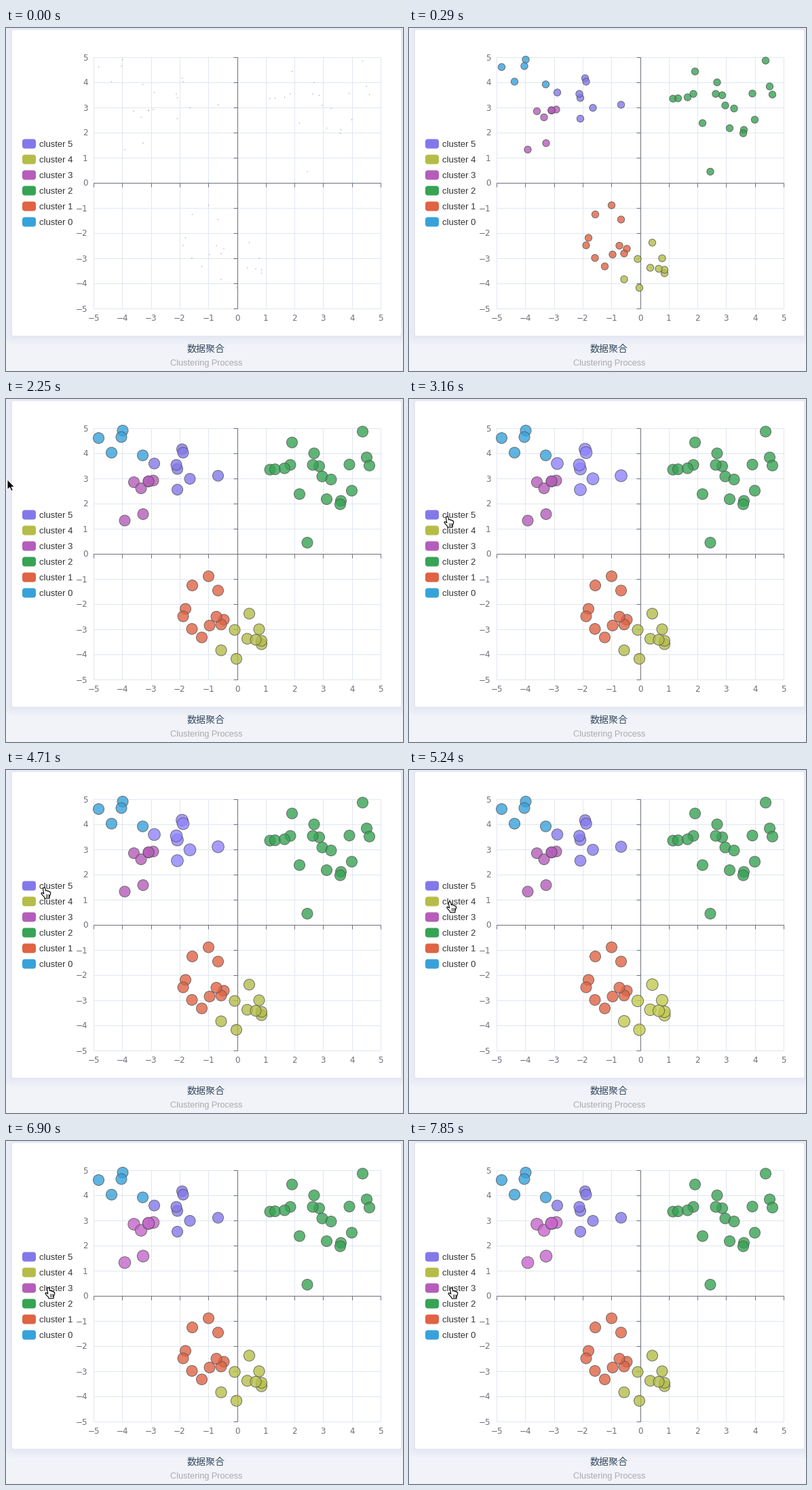
A matplotlib script for the animation above (8 s loop, 585 by 505 pixels).

```python
import numpy as np
import matplotlib.pyplot as plt
from matplotlib.animation import FuncAnimation
from matplotlib.colors import to_rgb
from matplotlib.patches import FancyBboxPatch, Polygon, Rectangle

W, H, DPI = 585, 505, 80
PT = 72 / DPI              # points per pixel
STEP, LOOP = 40, 8000
GROW = 560
RADIUS, OPACITY = 8, 0.8

COLORS = ["#37a2da", "#e06343", "#37a354", "#b55dba", "#b5bd48", "#8378ea"]
CLUSTERS = [
    [(172, 46.5), (136.5, 57.5), (170, 56), (155.5, 79), (201.5, 83)],
    [(298.5, 261), (274.5, 274.5), (312.5, 282), (264.5, 309), (261, 320),
     (274, 338.5), (288.5, 351), (300, 333.5), (321, 325), (317, 332),
     (310, 320.5)],
    [(525.5, 48), (421.5, 64), (454, 80), (389, 104), (396.5, 103.5),
     (419, 97), (410.5, 102), (461.5, 99), (452, 97), (466, 114),
     (479, 118.5), (506, 96.5), (531.5, 86), (535.5, 98), (432.5, 140),
     (472.5, 147.5), (493.5, 150), (492.5, 155), (509.5, 135), (444, 211.5)],
    [(188.5, 122.5), (199, 131.5), (217, 120), (210, 121.5), (210, 121),
     (202, 169.5), (175, 179)],
    [(358.5, 316), (337, 340), (355.5, 353), (373, 339), (376.5, 361),
     (376.5, 356), (368, 354.5), (317, 370), (339.5, 382.5)],
    [(259.5, 74), (261, 79), (218.5, 95), (252.5, 103), (251, 97),
     (271, 117.5), (312.5, 113), (252.5, 133.5)],
]
HOVER = {5: (2690, 5170), 4: (5170, 6770), 3: (6770, 9000)}
HIDDEN = {5: (3760, 4710), 4: (5710, 6430), 3: (7310, 7850)}

# Pointer moves: start, end, from, to
MOVES = [
    (2250, 2770, (-2, 114), (51, 173)),
    (3070, 3160, (51, 173), (56, 173)),
    (5070, 5330, (56, 173), (60, 195)),
    (6730, 6930, (60, 195), (62, 216)),
]
ARROW = np.array([(0, 0), (0, 15), (3.5, 11.8), (5.8, 17), (8.3, 16),
                  (6.1, 11), (10.6, 11)])
HAND = np.array([(4, 1.5), (5.5, .8), (6.7, 1.6), (7.6, 6), (8.5, 5.4),
                 (9.8, 5.6), (10.3, 6.5), (11.3, 6), (12.4, 6.6), (12.7, 7.5),
                 (13.8, 7.3), (14.7, 8.2), (14.6, 11), (13.2, 14), (13, 17),
                 (6, 17), (5.4, 15), (3, 12.5), (1, 10), (1.2, 8.8),
                 (2.5, 8.7), (4.8, 10.3), (3.6, 4)]) - (5, 1)

fig = plt.figure(figsize=(W / DPI, H / DPI), dpi=DPI, facecolor="#f1f3f9")
ax = fig.add_axes([0, 0, 1, 1])
ax.set(xlim=(0, W), ylim=(H, 0))
ax.axis("off")


def text(x, y, label, size, color, font="Liberation Sans", ha="center"):
    return ax.text(x, y, label, fontsize=size * PT, color=color, family=font,
                   ha=ha, va="baseline")


def line(xs, ys, color, z):
    ax.plot(xs, ys, color=color, lw=PT, zorder=z, solid_capstyle="butt")


def rounded(x, y, w, h, r, color, **style):
    box = FancyBboxPatch((x, y), w, h, boxstyle=f"round,pad=0,rounding_size={r}",
                         facecolor=color, edgecolor="none", **style)
    return ax.add_patch(box)


def draw_card():
    for grow in range(2, 13, 2):
        rounded(9 - grow, 4 - grow, 573 + 2 * grow, 450 + 2 * grow, grow + 2,
                "#5a6080", alpha=0.008, zorder=0)
    rounded(9, 3, 573, 450, 2, "white", zorder=0.5)
    text(295, 476.3, "数据聚合", 14, "#34495e", "Noto Sans CJK JP")
    subtitle = text(295, 496.5, "Clustering Process", 12.6, "#aaaaaa")
    subtitle.set_clip_path(Rectangle((0, 0), W, 497, transform=ax.transData))


def draw_axes():
    grid, ink = "#e0e6f1", "#6e7079"
    for v in range(-5, 6):
        x, y = 340.5 + 42.3 * v, 228 - 37 * v
        line([x, x], [43, 413], grid, 1)
        line([129, 552], [y, y], grid, 1)
        line([x, x], [228, 234], ink, 2)
        line([335, 340.5], [y, y], ink, 2)
        label = str(v).replace("-", "\u2212")
        text(x, 430.6, label, 12, ink, "DejaVu Sans")
        text(120.5, y + 4.5, label, 12, ink, "DejaVu Sans", "right")
    line([129, 552], [228, 228], ink, 2)
    line([340.5, 340.5], [43, 413], ink, 2)


draw_card()
draw_axes()

icons, names = [], []
for k, color in enumerate(COLORS):
    y = 285.5 - 23 * k
    icons.append(rounded(24, y - 7, 20, 14, 4, color, zorder=3))
    names.append(text(49, y + 4.4, f"cluster {k}", 13, "#333333", ha="left"))

points = np.array([p for group in CLUSTERS for p in group])
owner = np.repeat(np.arange(len(CLUSTERS)), [len(g) for g in CLUSTERS])
dots = ax.scatter(*points.T, edgecolors=[(1 / 3, 1 / 3, 1 / 3, OPACITY)],
                  linewidths=PT, zorder=4)

arrow = ax.add_patch(Polygon(ARROW, facecolor="black", edgecolor="white",
                             lw=PT, zorder=9))
hand = ax.add_patch(Polygon(HAND, facecolor="white", edgecolor="black",
                            lw=1.1 * PT, joinstyle="round", zorder=9))
creases = [ax.plot([], [], color="black", lw=0.8 * PT, zorder=10)[0]
           for _ in range(3)]


def progress(t, start, end):
    return min(max((t - start) / (end - start), 0), 1)


def cubic_out(p):
    return 1 - (1 - p) ** 3


def cubic_in_out(p):
    return 4 * p ** 3 if p < 0.5 else 1 - 4 * (1 - p) ** 3


def emphasis(k, t):
    start, end = HOVER.get(k, (LOOP * 2, LOOP * 3))
    return (cubic_out(progress(t, start, start + 300))
            - cubic_out(progress(t, end, end + 300)))


def is_hidden(k, t):
    start, end = HIDDEN.get(k, (0, 0))
    return start <= t < end


def pointer(t):
    pos = np.array(MOVES[0][2], float)
    for start, end, a, b in MOVES:
        if t >= start:
            p = progress(t, start, end)
            p = 1 - (1 - p) ** 2
            pos = np.array(a) + p * (np.array(b) - a)
    return pos


def draw_pointer(t):
    pos = pointer(t)
    over_legend = t >= HOVER[5][0]
    arrow.set_visible(2250 <= t and not over_legend)
    hand.set_visible(over_legend)
    arrow.set_xy(ARROW + pos)
    hand.set_xy(HAND + pos)
    for i, crease in enumerate(creases):
        x = pos[0] + 2.9 + 2 * i
        crease.set_data([x, x], [pos[1] + 9.5, pos[1] + 13.5])
        crease.set_visible(over_legend)


def update(i):
    t = i * STEP + 30
    grown = max(cubic_in_out(progress(t, 0, GROW)), 0.02)
    radii, fills = [], []
    for k, color in enumerate(COLORS):
        e = emphasis(k, t)
        hidden = is_hidden(k, t)
        shade = "white" if hidden else color
        lifted = np.minimum(np.array(to_rgb(shade)) * (1 + 0.1 * e), 1)
        fills.append((*lifted, OPACITY))
        radii.append(RADIUS * grown * (1 + 0.1 * e))
        icons[k].set_facecolor(shade)
        names[k].set_color("#cccccc" if hidden else "#333333")
    dots.set_sizes((2 * np.array(radii)[owner] * PT) ** 2)
    dots.set_facecolors(np.array(fills)[owner])
    draw_pointer(t)
    return []


anim = FuncAnimation(fig, update, frames=LOOP // STEP, interval=STEP,
                     init_func=lambda: update(0), repeat=True, repeat_delay=0)
plt.show()
```
